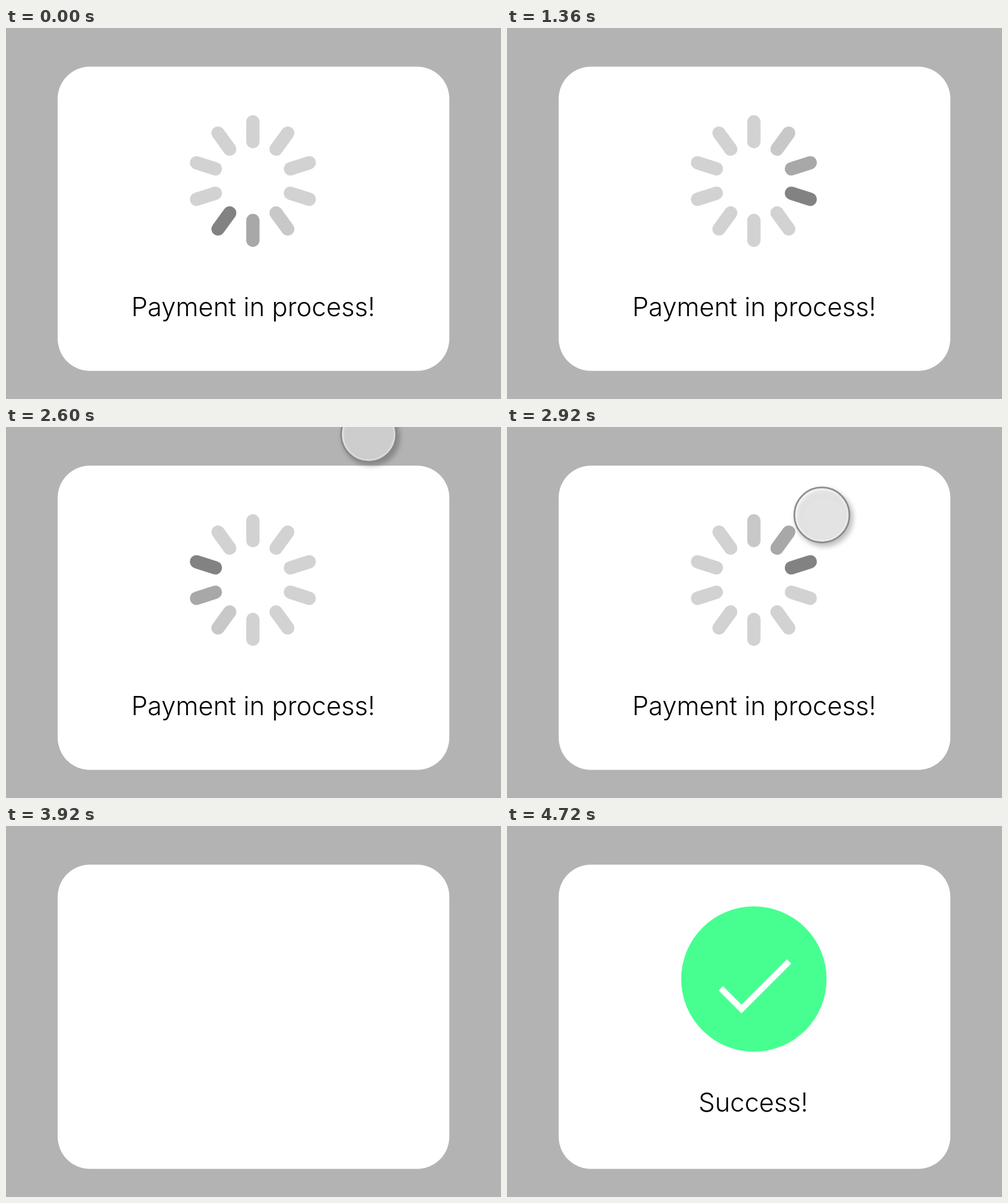
These frames come from a looping animation (800x600 px, 6.36 s). An HTML page:

```html
<!DOCTYPE html>
<html lang="en">
<head>
<meta charset="utf-8">
<title>Payment status</title>
<style>
  html, body { margin: 0; width: 100%; height: 100%; overflow: hidden; background: #b3b3b3; }
  svg { display: block; width: 100%; height: 100%; }
  text { font: 300 42px Inter, "Liberation Sans", sans-serif; letter-spacing: -.1px; text-anchor: middle; }

  .pending, .cursor, .icon, .done { animation: 6360ms linear infinite both; }
  .pending { animation-name: pending; }
  .cursor { animation-name: cursor; filter: drop-shadow(4px 5px 4px rgba(0, 0, 0, .35)); }
  .icon { animation-name: icon; }
  .done { animation-name: done; }

  @keyframes pending {
    0%, 53.459% { opacity: 1; animation-timing-function: ease-in-out; }
    58.805%, 100% { opacity: 0; }
  }
  @keyframes cursor {
    0%, 34.591% { transform: translate(642px, -83px); opacity: 1; animation-timing-function: cubic-bezier(.37, 0, .63, 1); }
    50.314%, 53.459% { transform: translate(480px, 191px); opacity: 1; animation-timing-function: ease-in-out; }
    58.805%, 100% { transform: translate(586px, 12px); opacity: 0; }
  }
  @keyframes icon {
    0%, 61.635% { opacity: 0; animation-timing-function: ease-in-out; }
    66.038%, 100% { opacity: 1; }
  }
  @keyframes done {
    0%, 67.925% { transform: translateY(120px); opacity: 0; animation-timing-function: ease-out; }
    74.214%, 100% { transform: none; opacity: 1; }
  }
</style>
</head>
<body>
<svg viewBox="0 0 800 600">
  <rect width="800" height="600" fill="#b3b3b3"/>
  <rect x="83.5" y="62.5" width="633" height="492" rx="52" fill="#fff"/>

  <g class="pending">
    <g id="spinner" transform="translate(399 247.5)"></g>
    <text x="399.5" y="466">Payment in process!</text>
  </g>

  <g class="icon">
    <circle cx="399" cy="247.5" r="117.5" fill="#47ff90"/>
    <path d="M345.5 262.5L379 296L456 219" fill="none" stroke="#fff" stroke-width="9.9"/>
  </g>
  <text class="done" x="398" y="462">Success!</text>

  <g class="cursor">
    <circle r="45" fill="#f2f2f2" fill-opacity=".63"/>
    <circle r="42" fill="none" stroke="#fff" stroke-opacity=".35" stroke-width="3"/>
    <circle r="44.5" fill="none" stroke="#868686" stroke-width="2.5"/>
  </g>
</svg>
<script>
  const LOOP = 6360, TICK = 40, STEP = 81, COUNT = 10, START = 6;
  const TRAIL = [130, 168, 200, 210];
  const IDLE = 210;

  const spinner = document.getElementById('spinner');
  const bars = Array.from({ length: COUNT }, (_, i) => {
    const bar = document.createElementNS(spinner.namespaceURI, 'rect');
    const attrs = { x: -10.75, y: -106.5, width: 21.5, height: 53.5, rx: 10.75, transform: `rotate(${i * 360 / COUNT})` };
    for (const key in attrs) bar.setAttribute(key, attrs[key]);
    return spinner.appendChild(bar);
  });

  // Grey level by the number of steps since the bar was lit.
  function shade(age) {
    const i = Math.floor(age), level = k => TRAIL[k] ?? IDLE;
    return level(i) + (level(i + 1) - level(i)) * (age - i);
  }

  // Each step is a quick fade followed by a rest.
  function phaseAt(time) {
    const u = time / STEP + .5, step = Math.floor(u);
    return step + Math.min(0, 4 * (u - step) - 1);
  }

  function draw(time) {
    const phase = phaseAt(Math.floor(time / TICK) * TICK) + START;
    bars.forEach((bar, i) => {
      const age = ((phase - i) % COUNT + COUNT) % COUNT;
      const rising = age - (COUNT - 1);
      const grey = Math.round(rising > 0 ? IDLE + (TRAIL[0] - IDLE) * rising : shade(age));
      bar.setAttribute('fill', `rgb(${grey},${grey},${grey})`);
    });
  }

  let begin;
  function frame(now) {
    begin ??= now;
    draw((now - begin) % LOOP);
    requestAnimationFrame(frame);
  }
  draw(0);
  requestAnimationFrame(frame);
</script>
</body>
</html>
```
